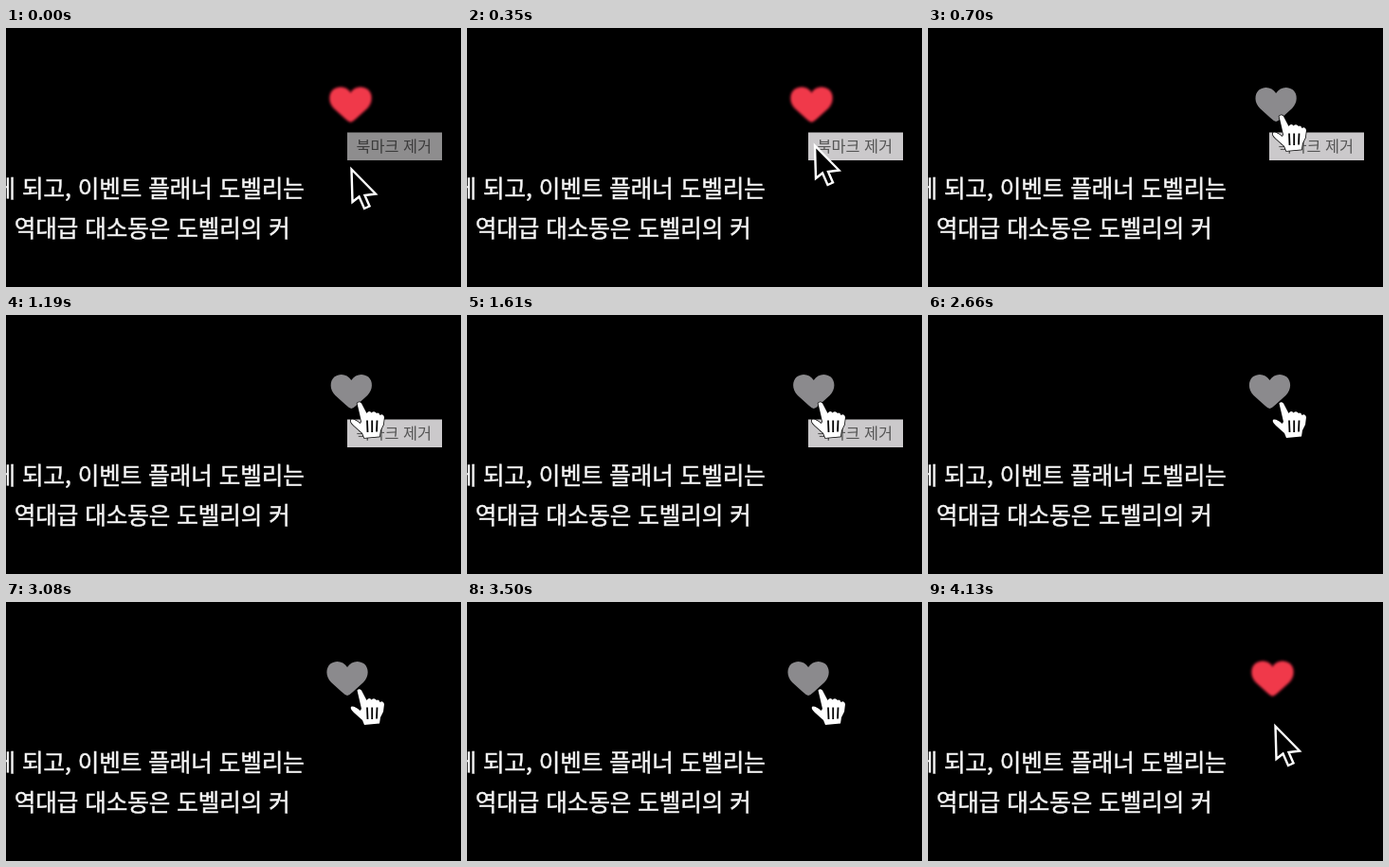
Recreate the animation shown at these times as an HTML page. Size 480 px wide and 274 px high, loop 4.62 s.

```html
<!DOCTYPE html>
<html lang="ko">
<head>
<meta charset="utf-8">
<style>
  html, body { margin: 0; width: 100%; height: 100%; overflow: hidden; background: #000; }
  svg { display: block; width: 100%; height: 100%; font-family: "Noto Sans CJK KR", "Noto Sans CJK", sans-serif; }
  .story { font-size: 24.5px; fill: #f4f4f4; stroke: #f4f4f4; stroke-width: .5; text-anchor: end; }
</style>
</head>
<body>
<svg viewBox="0 0 480 274">
  <g class="story">
    <text x="314.8" y="178.7">게 되고, 이벤트 플래너 도벨리는</text>
    <text x="299.8" y="220.7">역대급 대소동은 도벨리의 커</text>
  </g>
  <path id="heart" stroke-width="3" paint-order="stroke" d="M0 99Q-3 98-6 95L-17 85C-23 79-23 70-18 65.5C-12 61-4 62.5 0 69C4 62.5 12 61 18 65.5C23 70 23 79 17 85L6 95Q3 98 0 99Z"/>
  <g id="tip">
    <rect x="360" y="110.5" width="100" height="29.5" fill="#cbc9cb"/>
    <text x="369.5" y="130.5" font-size="16.3" fill="#555">북마크 제거</text>
  </g>
  <path id="arrow" fill="#000" stroke="#fff" stroke-width="2.4" d="M.5 2.5L1.5 37L8.5 31.5L14 44L19.5 41.5L14.5 30L26 28.5Z"/>
  <g id="hand">
    <path fill="#fff" stroke="#000" stroke-width="1.5" paint-order="stroke" d="M-1.5 1.5Q.5-1 3 1.5L8.5 12Q11 8.5 13.5 11.5Q16.5 9 19 12Q21 10.5 22.5 14Q26 12 27 16L26 24L23 30L22 36.5L6 38L4 33L-5 25Q-10 20-7.5 18.5Q-3.5 18 1.5 23L3 21Z"/>
    <path fill="none" stroke="#000" stroke-width="1.8" d="M9 19.5L9.5 32M14.2 19.5V32M19.5 19.5L19 31.5"/>
  </g>
</svg>
<script>
const [heart, tip, arrow, hand] = ['heart', 'tip', 'arrow', 'hand'].map(id => document.getElementById(id));
const STEP = 70, LOOP = 4620;
const clamp = v => Math.max(0, Math.min(1, v));
const mix = (a, b, k) => a + (b - a) * clamp(k);
const move = (el, x, y) => el.setAttribute('transform', `translate(${x} ${y})`);
const show = (el, on) => el.setAttribute('opacity', +on);

function draw(now) {
  const n = Math.floor(now % LOOP / STEP);

  // The unmarked heart sways from side to side
  const red = n < 7 || n >= 52;
  const sway = 364.5 - 4.5 * Math.cos((n - 31.2) / 6.33 * 2 * Math.PI);
  move(heart, red ? 363.5 : sway, 0);
  heart.setAttribute('fill', red ? '#f0394a' : '#8b8a8d');
  heart.setAttribute('stroke', red ? '#64111e' : 'none');
  heart.style.filter = red ? 'blur(.9px)' : 'none';

  show(tip, n === 0 ? 0.7 : n < 35 ? 1 : n === 35 ? 0.5 : 0);

  const pointing = n >= 9 && n < 57;
  show(hand, pointing);
  show(arrow, !pointing);
  move(hand, 372, n < 10 ? 97 : mix(92, 106, (n - 53) / 3));
  if (n < 9) move(arrow, mix(364, 368, n / 8), mix(147, 107, n / 8));
  else move(arrow, 366, mix(113, 129, (n - 57) / 2));
}

const start = performance.now();
function tick() {
  draw(performance.now() - start);
  requestAnimationFrame(tick);
}
tick();
</script>
</body>
</html>
```
